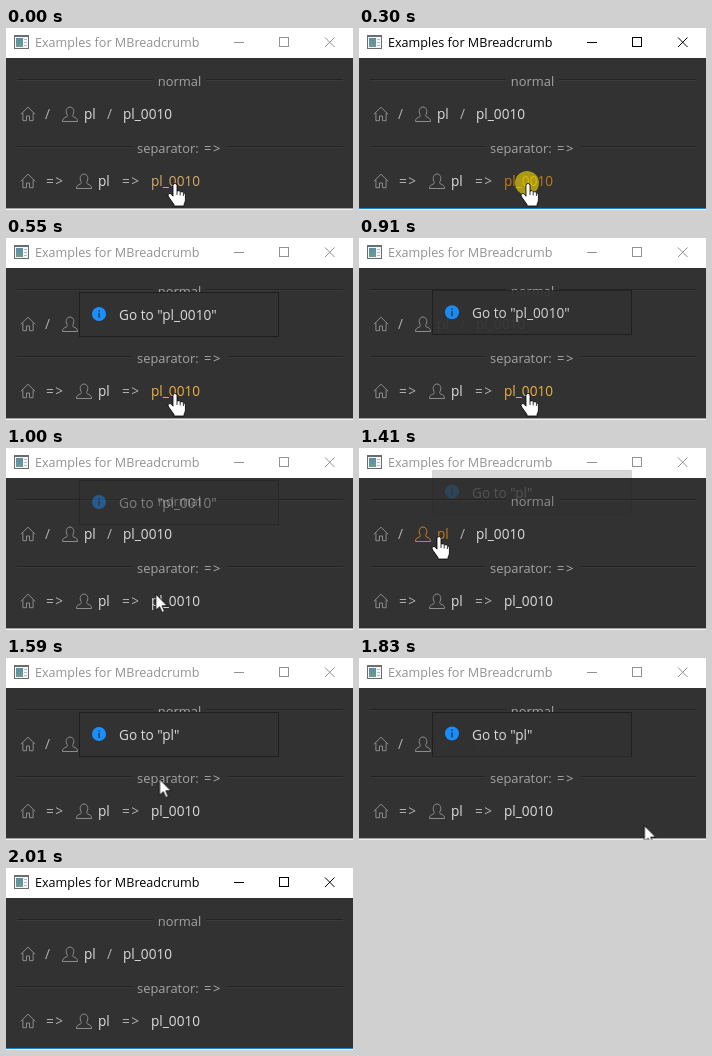
Write an HTML page that moves like this. It is 347 by 182 pixels and loops after 2.11 s.

```html
<!DOCTYPE html>
<html lang="en">
<head>
<meta charset="utf-8">
<title>Breadcrumb examples</title>
<style>
html, body { margin: 0; width: 100%; height: 100%; overflow: hidden; background: #323232; }
svg { display: block; font: 13.6px "Open Sans", "Noto Sans", sans-serif; }
.sharp { shape-rendering: crispEdges; }
.label { font-size: 12.9px; fill: #a3a3a3; }
.sep { fill: #b2b2b2; }
.arrow { letter-spacing: 1.6px; fill: #b2b2b2; }
.link { fill: #dcdcdc; }
.icon { fill: none; stroke: #8c8c8c; stroke-width: 1; }

.chrome, .edge, .first, .second, .crumb-text, .crumb-icon, .target,
.hand, .pointer, .click { animation: 2110ms step-end infinite; }
.chrome { animation-name: chrome; }
.edge { animation-name: edge; }
.first { animation-name: first; }
.second { animation-name: second; }
.crumb-text { animation-name: crumb-text; }
.crumb-icon { animation-name: crumb-icon; }
.target { animation-name: target; }
.hand { animation-name: hand; }
.pointer { animation-name: pointer; }
.click { animation-name: click; }
.popup { animation: popup 2110ms linear infinite; }
.cursor { animation: cursor 2110ms linear infinite; }

/* Window focus */
@keyframes chrome {
  0%, 17.5%, 66.8% { color: #929292; }
  14.2%, 50.7%, 93.8% { color: #000; }
}
@keyframes edge {
  0%, 17.5%, 66.8% { fill: #a0a0a0; }
  14.2%, 50.7%, 93.8% { fill: #1883d7; }
}

/* Message slides down while fading in, then reverses */
@keyframes popup {
  0%, 17.1% { transform: translateY(-40px); opacity: 0; animation-timing-function: cubic-bezier(.215, .61, .355, 1); }
  25.5%, 41% { transform: none; opacity: 1; animation-timing-function: cubic-bezier(.55, .055, .675, .19); }
  49%, 66.3% { transform: translateY(-40px); opacity: 0; animation-timing-function: cubic-bezier(.215, .61, .355, 1); }
  74.8%, 86% { transform: none; opacity: 1; animation-timing-function: cubic-bezier(.55, .055, .675, .19); }
  93.8%, 100% { transform: translateY(-40px); opacity: 0; }
}
@keyframes first { 0% { visibility: visible; } 60%, 100% { visibility: hidden; } }
@keyframes second { 0% { visibility: hidden; } 60%, 100% { visibility: visible; } }

/* Hover colours */
@keyframes target {
  0% { fill: #d8aa68; }
  14.2% { fill: #c27a1a; }
  17.5% { fill: #f0b23c; }
  47.3%, 100% { fill: #dcdcdc; }
}
@keyframes crumb-text {
  0%, 69.6%, 100% { fill: #dcdcdc; }
  53% { fill: #f29c5a; }
  64% { fill: #c27a1a; }
}
@keyframes crumb-icon {
  0%, 69.6%, 100% { stroke: #8c8c8c; }
  53% { stroke: #d07f1c; }
}

/* Mouse */
@keyframes cursor {
  0%, 44.6% { transform: translate(169px, 156px); animation-timing-function: ease-in-out; }
  54.5% { transform: translate(57px, 99px); animation-timing-function: ease-out; }
  60.5%, 67.5% { transform: translate(80px, 89px); animation-timing-function: ease-in; }
  75.35% { transform: translate(153px, 121px); }
  90.8%, 100% { transform: translate(332px, 184px); }
}
@keyframes hand {
  0%, 53% { visibility: visible; }
  47.3%, 69.6%, 100% { visibility: hidden; }
}
@keyframes pointer {
  0%, 53%, 91%, 100% { visibility: hidden; }
  47.3%, 69.6% { visibility: visible; }
}
@keyframes click {
  0%, 18.9%, 66.8%, 100% { visibility: hidden; }
  14.2%, 64% { visibility: visible; }
}
</style>
</head>
<body>
<svg width="347" height="182" viewBox="0 0 347 182">
  <defs>
    <path id="home" d="M.8 8.3 8 1.2l7.2 7.1M2.9 6.8v7.9h3.6V10h3v4.7h3.6V6.8"/>
    <path id="user" d="M5 8.5C3 4.5 5 1 8 1s5 3.5 3 7.5c-.5 1-.5 2 .5 2.4 2.5 1 4 1.6 4 4.6H.5c0-3 1.5-3.6 4-4.6 1-.4 1-1.4.5-2.4z"/>
    <linearGradient id="pane" x2="0" y2="1">
      <stop stop-color="#5b8caa"/>
      <stop offset="1" stop-color="#6f9c8c"/>
    </linearGradient>
  </defs>

  <rect width="347" height="182" fill="#323232"/>

  <!-- Title bar -->
  <rect width="347" height="30" fill="#fff"/>
  <g class="sharp">
    <rect x="8" y="7" width="15" height="14" fill="#6a6e70"/>
    <rect x="9" y="9" width="13" height="11" fill="#f4f6f7"/>
    <rect x="10" y="10" width="7" height="9" fill="url(#pane)"/>
    <path d="M18 11h3v1h-3zm0 3h3v1h-3zm0 3h3v1h-3z" fill="#b5bbc0"/>
  </g>
  <g class="chrome">
    <text x="29" y="19" font-size="12.6" fill="currentColor">Examples for MBreadcrumb</text>
    <g fill="none" stroke="currentColor">
      <path class="sharp" d="M228 14.5h10M273.5 9.5h9v9h-9z"/>
      <path d="m319 9.5 9.5 9.5m0-9.5L319 19"/>
    </g>
  </g>

  <!-- Dividers -->
  <g class="sharp">
    <path d="M11 51.5h136m53 0h137M11 118.5h115m96 0h115" stroke="#222"/>
    <path d="M11 52.5h136m53 0h137M11 119.5h115m96 0h115" stroke="#3a3a3a"/>
  </g>
  <text class="label" x="173.5" y="58" text-anchor="middle">normal</text>
  <text class="label" x="131" y="125">separator:</text>
  <text class="label arrow" x="198" y="125">=&gt;</text>

  <!-- Slash breadcrumb -->
  <use class="icon" href="#home" x="14" y="78"/>
  <text class="sep" x="39" y="91">/</text>
  <use class="icon crumb-icon" href="#user" x="56" y="78"/>
  <text class="link crumb-text" x="78" y="91">pl</text>
  <text class="sep" x="101" y="91">/</text>
  <text class="link" x="117" y="91">pl_0010</text>

  <!-- Arrow breadcrumb -->
  <use class="icon" href="#home" x="14" y="145"/>
  <text class="arrow" x="40" y="158">=&gt;</text>
  <use class="icon" href="#user" x="70" y="145"/>
  <text class="link" x="92" y="158">pl</text>
  <text class="arrow" x="116" y="158">=&gt;</text>
  <text class="link target" x="145" y="158">pl_0010</text>

  <rect class="edge" y="180" width="347" height="1"/>
  <rect y="181" width="347" height="1" fill="#f0f0f0"/>

  <!-- Message -->
  <g class="popup">
    <rect class="sharp" x="73.5" y="54.5" width="199" height="44" fill="#323232" stroke="#1f1f1f"/>
    <circle cx="93" cy="76" r="7" fill="#1890ff"/>
    <path d="M92.4 72h1.3v1.4h-1.3zm0 2.7h1.3v5.2h-1.3z" fill="#323232"/>
    <text class="link first" x="113" y="82">Go to "pl_0010"</text>
    <text class="link second" x="113" y="82">Go to "pl"</text>
  </g>

  <g class="cursor">
    <circle class="click" cx="-1" cy="-1" r="12" fill="#f0dc00" opacity=".62"/>
    <g class="hand" fill="#fff" stroke="#000" stroke-width=".8">
      <path d="M-2 1.5a2 2 0 0 1 4 0V7q2.6-1 3.2.8 2.6-.6 3.2 1 2-.2 2 2.2v5q0 2-1.3 4v2H-1v-1.5L-6.3 13q-1.5-2.2 0-3.2 1.6-.9 2.8.8L-2 12.2z"/>
      <path d="M2 7v4M5.2 8v3.4M8.4 9v3" fill="none"/>
    </g>
    <path class="pointer" d="M0 0v16l3.7-3.5 2.5 5.7 2.4-1-2.4-5.6h5.1z" fill="#fff" stroke="#000" stroke-width=".8"/>
  </g>
</svg>
</body>
</html>
```
